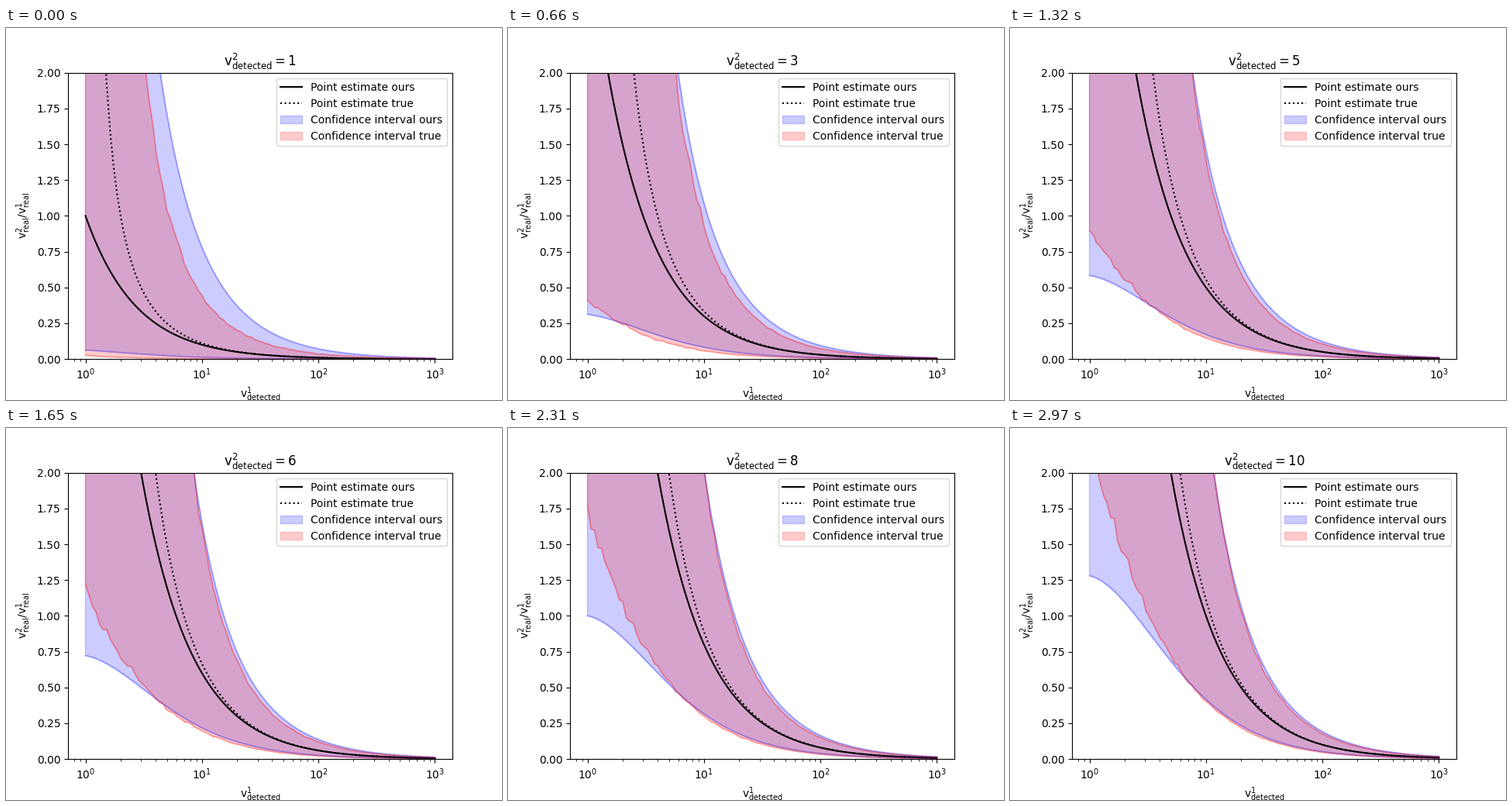
Recreate the animation shown at these times as a matplotlib script. Size 640 by 480 pixels, loop 3300 ms.

```python
import matplotlib.pyplot as plt
import numpy as np
from matplotlib.animation import FuncAnimation

FRAMES = 10
INTERVAL = 330
SAMPLES = 10000
Z = 1.96

x = np.logspace(0, 3, 100)


def approximate_interval(k):
    """Log-normal interval for the ratio of two Poisson rates."""
    spread = np.exp(Z * np.sqrt(1 / k + 1 / x))
    return k / x / spread, k / x * spread


def sampled_interval(k):
    """Monte Carlo interval for the ratio of two gamma posteriors."""
    rng = np.random.default_rng(k)
    size = (SAMPLES, len(x))
    ratio = rng.gamma(k, size=size) / rng.gamma(x, size=size)
    return np.percentile(ratio, [2.5, 97.5], axis=0)


counts = range(1, FRAMES + 1)
intervals = [(approximate_interval(k), sampled_interval(k)) for k in counts]

fig, ax = plt.subplots(figsize=(6.4, 4.8), dpi=100)


def draw_band(bounds, color, label):
    low, high = bounds
    ax.plot(x, low, color=color, alpha=0.2)
    ax.plot(x, high, color=color, alpha=0.2)
    ax.fill_between(x, low, high, color=color, alpha=0.2, label=label)


def draw(frame):
    k = frame + 1
    ours, true = intervals[frame]
    ax.clear()
    ax.plot(x, k / x, "k", label="Point estimate ours")
    ax.plot(x[1:], k / (x[1:] - 1), "k:", label="Point estimate true")
    draw_band(ours, "blue", "Confidence interval ours")
    draw_band(true, "red", "Confidence interval true")
    ax.set_xscale("log")
    ax.set_xlim(10 ** -0.15, 10 ** 3.15)
    ax.set_ylim(0, 2)
    ax.set_title(rf"$\mathrm{{v_{{detected}}^2}} = {k}$")
    ax.set_xlabel(r"$\mathrm{v_{detected}^1}$")
    ax.set_ylabel(r"$\mathrm{v_{real}^2/v_{real}^1}$")
    ax.legend(loc="upper right")
    return []


anim = FuncAnimation(fig, draw, frames=FRAMES, interval=INTERVAL,
                     repeat=True, repeat_delay=0)
plt.show()
```
